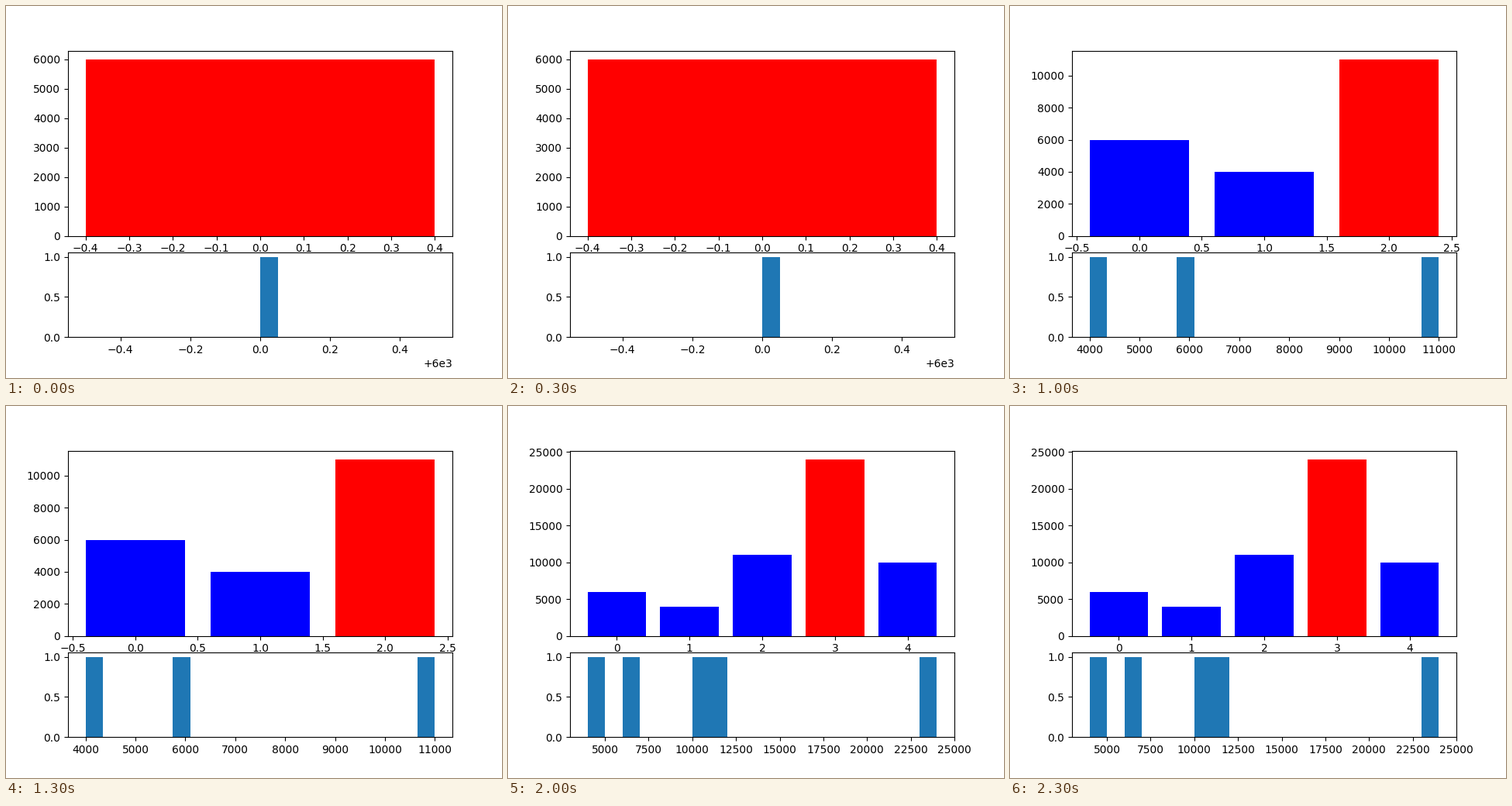
A matplotlib script that plays this animation: 640x480 px, repeating every 2.5 s.

```python
import matplotlib.pyplot as plt
from matplotlib.animation import FuncAnimation

VALUES = [6000, 4000, 11000, 24000, 10000]
BINS = 20

fig = plt.figure(figsize=(6.4, 4.8), dpi=100)
grid = fig.add_gridspec(3, 1)
bar_ax = fig.add_subplot(grid[:2])
hist_ax = fig.add_subplot(grid[2])


def draw(step):
    """Show the values up to this step, with the largest in red."""
    seen = VALUES[:step + 1]
    peak = max(seen)
    colors = ["red" if v == peak else "blue" for v in seen]

    bar_ax.clear()
    bar_ax.bar(range(len(seen)), seen, color=colors)

    hist_ax.clear()
    hist_ax.hist(seen, bins=BINS)
    return []


def reset():
    return draw(0)


anim = FuncAnimation(fig, draw, frames=len(VALUES), init_func=reset,
                     interval=500, repeat=True, blit=False)

plt.show()
```
